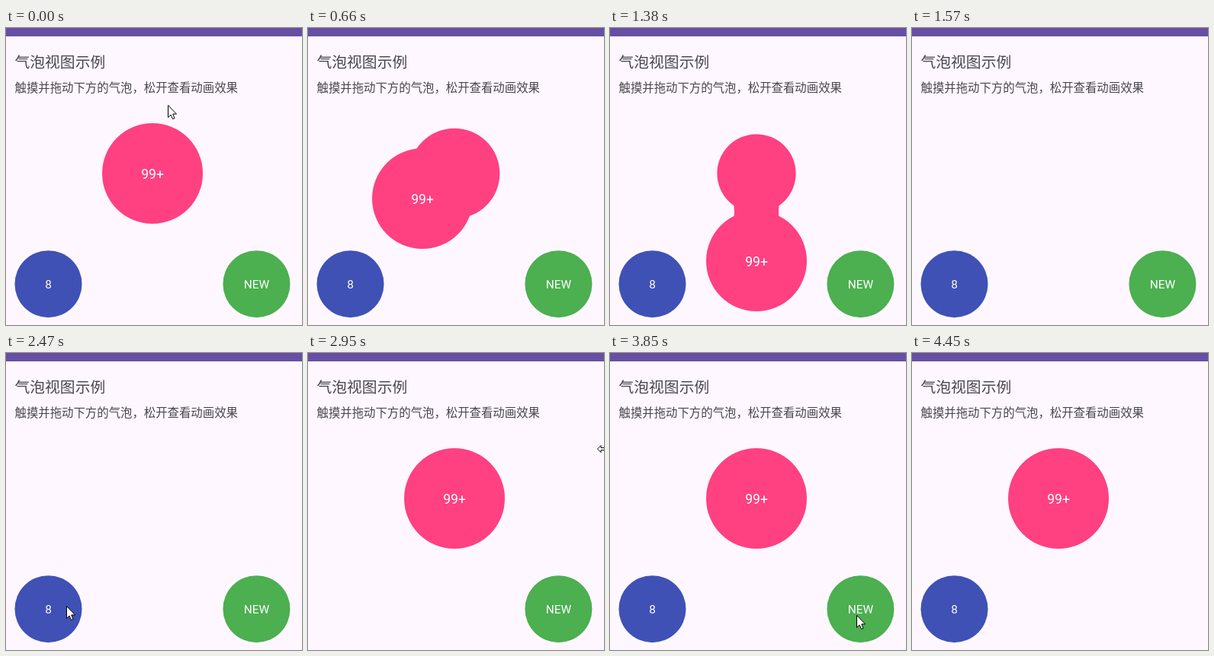
These frames come from a looping animation (388 px wide and 390 px high, 4630 ms). An HTML page:

```html
<!DOCTYPE html>
<html lang="zh-CN">
<head>
<meta charset="utf-8">
<title>气泡视图示例</title>
<style>
html, body { margin: 0; width: 100%; height: 100%; overflow: hidden; background: #fef7ff; }
svg { display: block; width: 388px; height: 390px; }
.cjk { font-family: "Noto Sans CJK SC", "Noto Sans CJK", sans-serif; fill: #49454f; }
.label { font-family: Roboto, sans-serif; fill: #fff; text-anchor: middle; }
.pointer { fill: #fff; stroke: #000; stroke-width: 1; }
</style>
</head>
<body>
<svg viewBox="0 0 388 390">
  <rect width="388" height="390" fill="#fef7ff"/>
  <rect width="388" height="11" fill="#6750a4"/>
  <text class="cjk" x="11.5" y="52" font-size="19.8" font-weight="500">气泡视图示例</text>
  <text class="cjk" x="11.5" y="84.4" font-size="15.4">触摸并拖动下方的气泡，松开查看动画效果</text>
  <g id="bubbles"></g>
  <path id="arrow" class="pointer" d="M.5 .5V16.5L4 13L6.5 18.5L9 17.5L6.7 12H11.5Z"/>
  <path id="resize" class="pointer" d="M379.5 126L384 121.5V124.5H395V127.5H384V130.5Z"/>
</svg>
<script>
const LOOP = 4630, TICK = 60;
const $ = id => document.getElementById(id);
const progress = (t, from, to) => Math.min(1, Math.max(0, (t - from) / (to - from)));

// A pull drags a bubble by (dx, dy); it pops afterwards unless it snaps back.
const pink = {
  x: 192, y: 191, r: 66, color: '#ff4081', text: '99+', size: 17.6,
  pulls: [{ from: 600, to: 780, dx: -126, dy: 99, snap: true },
          { from: 1080, to: 1380, dx: 0, dy: 115 }],
  gone: 1570, grow: 2590
};
const blue = {
  x: 55.5, y: 336.2, r: 44, color: '#3f51b5', text: '8', size: 15.4,
  pulls: [{ from: 2590, to: 2710, dx: 221, dy: -100 }],
  gone: 2770, grow: 3370
};
const green = {
  x: 328.4, y: 336.2, r: 44, color: '#4caf50', text: 'NEW', size: 15.4,
  pulls: [{ from: 3850, to: 3970, dx: -15, dy: 0 }],
  gone: 4030, grow: LOOP
};
const bubbles = [pink, blue, green];

// Each sweep is a curve a -> b bent towards c; the pointer may then hold a bubble.
const sweeps = [
  { from: 0, to: 480, end: 490, a: [212, 101], c: [190, 90], b: [180, 392] },
  { from: 2050, to: 2470, end: 2770, a: [229, 158], c: [150, 444], b: [79, 332], hold: blue },
  { from: 2950, to: 3550, end: 4330, a: [379, 121], c: [320, 374], b: [323, 344], hold: green },
  { from: 4270, to: 4390, end: 4450, a: [308, 344], c: [299, 332], b: [289, 319] }
];

function add(parent, tag, attrs) {
  const el = document.createElementNS('http://www.w3.org/2000/svg', tag);
  for (const k in attrs) el.setAttribute(k, attrs[k]);
  return parent.appendChild(el);
}

for (const b of bubbles) {
  b.neck = add($('bubbles'), 'path', { fill: b.color });
  b.body = add($('bubbles'), 'g', {});
  add(b.body, 'circle', { r: b.r, fill: b.color });
  add(b.body, 'text', { class: 'label', y: b.size * .38, 'font-size': b.size }).textContent = b.text;
}

function shift(b, t) {
  if (t >= b.grow) return [0, 0];
  const pull = b.pulls.findLast(p => t >= p.from);
  if (!pull) return [0, 0];
  const back = pull.snap ? progress(t, pull.to, pull.to + 2 * TICK) : 0;
  const k = progress(t, pull.from, pull.to) * (1 - back);
  return [pull.dx * k, pull.dy * k];
}

function scale(b, t) {
  const { to } = b.pulls[b.pulls.length - 1];
  return t < b.gone ? 1 - progress(t, to, b.gone) : progress(t, b.grow, b.grow + 3 * TICK);
}

// Sticky bridge from a shrinking anchor circle to the dragged circle.
function neckPath({ x, y, r }, dx, dy) {
  const d = Math.hypot(dx, dy);
  if (!d) return '';
  const a = r - d / 8, nx = -dy / d, ny = dx / d;
  const mid = `${x + dx / 2} ${y + dy / 2}`;
  const pt = (cx, cy, k) => `${cx + nx * k} ${cy + ny * k}`;
  return `M${pt(x, y, a)}Q${mid} ${pt(x + dx, y + dy, r)}L${pt(x + dx, y + dy, -r)}` +
    `Q${mid} ${pt(x, y, -a)}Z` +
    `M${x - a} ${y}a${a} ${a} 0 1 0 ${2 * a} 0a${a} ${a} 0 1 0 ${-2 * a} 0Z`;
}

function sweepPoint({ from, to, a, b, c, hold }, t) {
  const p = progress(t, from, to), q = 1 - p;
  const moved = hold ? shift(hold, t) : [0, 0];
  return a.map((v, i) => v * q * q + 2 * c[i] * p * q + b[i] * p * p + moved[i]);
}

function show(el, on) {
  el.setAttribute('visibility', on ? 'visible' : 'hidden');
}

function draw(time) {
  // Motion advances in ticks; the second part is 10 ms late.
  const lag = time < pink.gone ? 0 : 10;
  const t = lag + Math.floor((time - lag) / TICK) * TICK;

  for (const b of bubbles) {
    const [dx, dy] = shift(b, t), s = scale(b, t);
    b.neck.setAttribute('d', s === 1 ? neckPath(b, dx, dy) : '');
    b.body.setAttribute('transform', `translate(${b.x + dx} ${b.y + dy}) scale(${s})`);
    show(b.body, s > 0);
  }

  const sweep = sweeps.findLast(s => t >= s.from && t < s.end);
  const atEdge = t >= 2950 && t < 2950 + TICK;
  if (sweep) $('arrow').setAttribute('transform', `translate(${sweepPoint(sweep, t)})`);
  show($('arrow'), sweep && !atEdge);
  show($('resize'), atEdge);
}

const start = performance.now();
function tick() {
  draw((performance.now() - start) % LOOP);
  requestAnimationFrame(tick);
}
tick();
</script>
</body>
</html>
```
